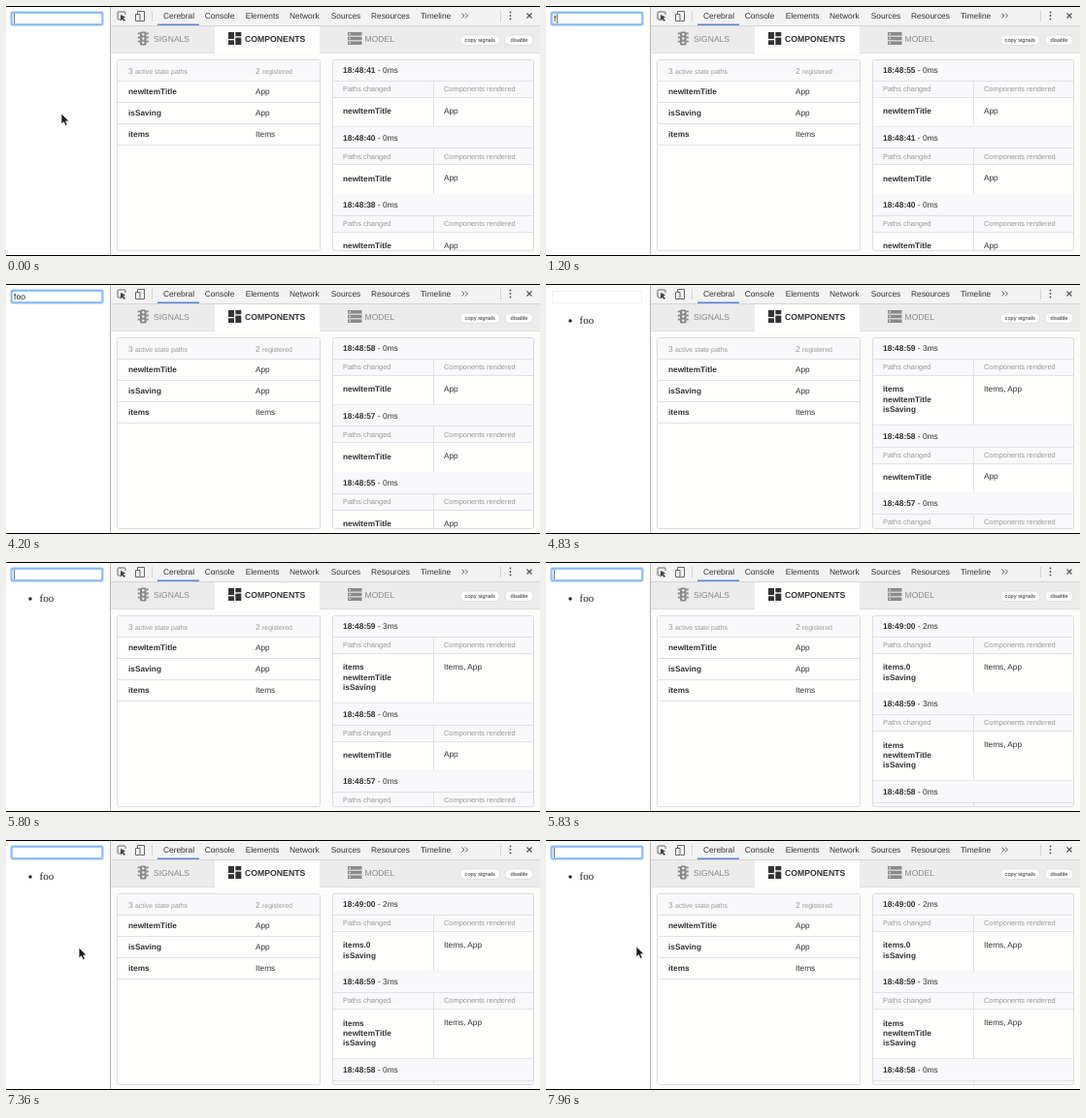
These frames come from a looping animation (550x258 px, 8000 ms). An HTML page:

```html
<!DOCTYPE html>
<html lang="en">
<head>
<meta charset="utf-8">
<title>Debugger panel</title>
<style>
html, body { margin: 0; width: 100%; height: 100%; overflow: hidden; background: #fff; }
svg { display: block; width: 100vw; height: 100vh; }
text { font-family: "Liberation Sans", Arial, sans-serif; white-space: pre; text-rendering: geometricPrecision; }
.serif { font-family: "Liberation Serif", Times, serif; }
.rule { shape-rendering: crispEdges; }
</style>
</head>
<body>
<svg id="stage" viewBox="0 0 550 258" preserveAspectRatio="none">
  <defs><clipPath id="panel"><rect x="336" y="55" width="208" height="197"/></clipPath></defs>
  <g id="chrome"></g>
  <g id="log" clip-path="url(#panel)"></g>
  <rect x="336.5" y="55.5" width="207" height="197" rx="2" fill="none" stroke="#dedee2"/>
  <g id="page"></g>
  <path id="pointer" d="M0 0V11L2.5 8.7 4.1 12.6 6.2 11.7 4.6 7.9H8Z" fill="#1c1c1c" stroke="#fff" stroke-width=".7"/>
  <path d="M0 .5H550M0 257.5H550" stroke="#000"/>
</svg>
<script>
const LOOP = 8000;
const $ = id => document.getElementById(id);
const DARK = '#333', MUTED = '#999', LINE = '#e2e2e6', HEAD = '#f9f9fb', PAPER = '#fefefd', ICON = '#8a8a8a';

const rect = (x, y, w, h, fill, extra = '') =>
  `<rect x="${x}" y="${y}" width="${w}" height="${h}" fill="${fill}" ${extra}/>`;
const path = (d, stroke, width = 1) =>
  `<path d="${d}" fill="none" stroke="${stroke}" stroke-width="${width}"/>`;
const rule = (d, stroke = LINE) => `<path class="rule" d="${d}" fill="none" stroke="${stroke}"/>`;
const dot = (x, y, r, fill) => `<circle cx="${x}" cy="${y}" r="${r}" fill="${fill}"/>`;
const text = (x, y, size, content, fill = DARK, extra = '') =>
  `<text x="${x}" y="${y}" font-size="${size}" fill="${fill}" ${extra}>${content}</text>`;
const each = (list, make) => list.map(make).join('');
const bold = 'font-weight="700"';

function toolbar() {
  const tabs = [['Cerebral', 162], ['Console', 204.7], ['Elements', 246.7], ['Network', 292],
    ['Sources', 334.7], ['Resources', 376], ['Timeline', 427]];
  return rect(107, 1, 443, 19, '#f3f3f3') +
    path('M118 14H116Q115 14 115 13V7Q115 6 116 6H122Q123 6 123 7V9', '#666') +
    '<path d="M118 9V15.5L119.7 13.8 121.8 16 123 14.8 120.9 12.7 123 11.3Z" fill="#444"/>' +
    path('M135.5 8V5.5H142.5V15.5H138.5M133.5 8.5H138V15.5H133.5Z', '#666') +
    rule('M150.5 5V16M509.5 5V16', '#d4d4d4') +
    each(tabs, ([name, x]) => text(x, 13.2, 8.35, name)) +
    path('M469.5 7.5L472 10 469.5 12.5M473 7.5L475.5 10 473 12.5', '#666') +
    each([6.5, 10, 13.5], y => dot(519.5, y, .9, '#555')) +
    path('M536.5 7.5L541.5 12.5M541.5 7.5L536.5 12.5', '#555', 1.2) +
    rule('M107 20.5H550', '#d6d6d6') + rect(156, 18.5, 43, 1.5, '#5585d6');
}

function modeTabs() {
  const pill = (x, w, label) => rect(x, 30, w, 10.5, '#fdfdfd', 'rx="5" stroke="#dcdcdc" stroke-width=".8"') +
    text(x + w / 2, 37.2, 5.7, label, DARK, 'text-anchor="middle"');
  const trafficLight = rect(138, 26.5, 6.6, 14, ICON, 'rx="1.5"') +
    each([29.3, 33.5, 37.7], y => dot(141.3, y, 1.3, '#ededed') +
      path(`M135.8 ${y - 1}H138M144.6 ${y - 1}H146.8`, ICON, 1.8));
  const storage = each([27, 31.7, 36.4], y => rect(352, y, 14.5, 3.6, ICON) +
    rect(353.5, y + 1.1, 1.4, 1.4, '#ededed'));
  const dashboard = rect(229, 27, 6, 7, DARK) + rect(236.3, 27, 6, 4.3, DARK) +
    rect(229, 35.3, 6, 4.7, DARK) + rect(236.3, 32.6, 6, 7.4, DARK);
  return rect(107, 21, 443, 27, '#ececec') + rect(215, 21, 108, 28, PAPER) +
    rule('M107 48.5H215M323 48.5H550', '#e0e0e0') +
    trafficLight + text(152, 36.8, 8.55, 'SIGNALS', ICON) +
    dashboard + text(246, 36.8, 8.7, 'COMPONENTS', DARK, bold) +
    storage + text(369.5, 36.8, 8.6, 'MODEL', ICON) +
    pill(468, 40.5, 'copy signals') + pill(514, 29, 'disable');
}

function pathsCard() {
  const count = (x, n, label) => text(x, 69.8, 8.4, `${n} <tspan font-size="6.95">${label}</tspan>`, MUTED);
  const rows = [['newItemTitle', 'App'], ['isSaving', 'App'], ['items', 'Items']];
  return rect(114.5, 55.5, 209, 197, PAPER, 'rx="2" stroke="#dedee2"') +
    rect(115, 56, 208, 21.5, HEAD) + rule('M115 77.5H323') +
    count(126, 3, 'active state paths') + count(257, 2, 'registered') +
    each(rows, ([name, owner], i) => {
      const y = 91.2 + i * 21.9;
      return text(126, y, 8.25, name, DARK, bold) + text(257, y, 8.25, owner) +
        rule(`M115 ${y + 8.3}H323`);
    });
}

function logEntry(y, { time, cost = 0, paths = ['newItemTitle'], parts = 'App' }) {
  const end = y + 69.5 + (paths.length - 1) * 10.6;
  const markup = rect(336, y, 208, 39, HEAD) + rect(336, y + 39, 208, end - y - 39, PAPER) +
    text(347, y + 14, 8.4, `<tspan ${bold}>18:${time}</tspan> - ${cost}ms`) +
    text(347, y + 33, 7.42, 'Paths changed', MUTED) + text(451, y + 33, 7.42, 'Components rendered', MUTED) +
    rule(`M336 ${y + 22.3}H544M336 ${y + 39.3}H544M336 ${end}H544M440.5 ${y + 22.3}V${end}`) +
    each(paths, (p, i) => text(347, y + 56.4 + i * 10.4, 8.25, p, DARK, bold)) +
    text(451, y + 55.7, 8.25, parts);
  return { markup, end };
}

const typed = ['48:38', '48:40', '48:41', '48:55', '48:57', '48:58'].map(time => ({ time }));
const entries = [...typed,
  { time: '48:59', cost: 3, paths: ['items', 'newItemTitle', 'isSaving'], parts: 'Items, App' },
  { time: '49:00', cost: 2, paths: ['items.0', 'isSaving'], parts: 'Items, App' }];
const logTimes = [1200, 2830, 3760, 4830, 5830];

function logMarkup(known) {
  let y = 55, out = '';
  for (const entry of entries.slice(known - 3, known).reverse()) {
    const { markup, end } = logEntry(y, entry);
    out += markup;
    y = end;
  }
  return out;
}

const SUBMIT = 4760, READY = 5800;
const keyTimes = [1160, 2760, 3700];
const caretPlaces = [8, 11, 15, 20];
const passed = (times, t) => times.filter(at => at <= t).length;

function caretOn(t) {
  // Each keystroke restarts the blink with the caret visible.
  const starts = [-170, ...keyTimes, READY].filter(at => at <= t);
  return (t < SUBMIT || t >= READY) && Math.floor((t - starts.at(-1)) / 500) % 2 === 0;
}

function pageMarkup(t) {
  const saving = t >= SUBMIT && t < READY;
  const letters = t < SUBMIT ? passed(keyTimes, t) : 0;
  const box = saving
    ? rect(6.5, 7.5, 92, 12, '#fff', 'stroke="#efefef" stroke-width=".8"')
    : rect(5.5, 6.5, 94, 13, '#fff', 'rx="1.5" stroke="#b9d8fb" stroke-width="2.6"') +
      rect(6, 7, 93, 12, '#fff', 'rx=".5" stroke="#7ab3f5" stroke-width="1.3"');
  const item = t >= SUBMIT
    ? dot(25, 38, 1.7, '#222') + text(34.5, 41.3, 11, 'foo', '#222', 'class="serif"') : '';
  return box + text(8, 16.3, 8.6, 'foo'.slice(0, letters), '#222') + item +
    (caretOn(t) ? rect(caretPlaces[letters], 8, 1, 10, '#777') : '');
}

const track = [[7160, 57, 111], [7360, 75, 111], [7530, 91, 110.3], [7790, 91, 110.3], [7960, 93, 109.8]];
function pointerAt(t) {
  if (t < 1100) return [57, 111];
  if (t < track[0][0]) return null;
  const next = track.findIndex(([at]) => at > t);
  if (next < 0) return track.at(-1).slice(1);
  const [t0, x0, y0] = track[next - 1], [t1, x1, y1] = track[next];
  const k = (t - t0) / (t1 - t0);
  return [x0 + (x1 - x0) * k, y0 + (y1 - y0) * k];
}

$('chrome').innerHTML = rect(0, 0, 550, 258, '#fefefe') + rect(107, 48, 443, 210, '#fcfcfb') +
  toolbar() + modeTabs() + pathsCard() + rule('M107.5 1V257', '#b8b8b8');

const shown = {};
function show(id, markup) {
  if (shown[id] === markup) return;
  shown[id] = markup;
  $(id).innerHTML = markup;
}

function draw(t) {
  show('log', logMarkup(3 + passed(logTimes, t)));
  show('page', pageMarkup(t));
  const spot = pointerAt(t);
  $('pointer').setAttribute('visibility', spot ? 'visible' : 'hidden');
  if (spot) $('pointer').setAttribute('transform', `translate(${spot})`);
}

const start = performance.now();
function tick() {
  draw((performance.now() - start) % LOOP);
  requestAnimationFrame(tick);
}
tick();
</script>
</body>
</html>
```
